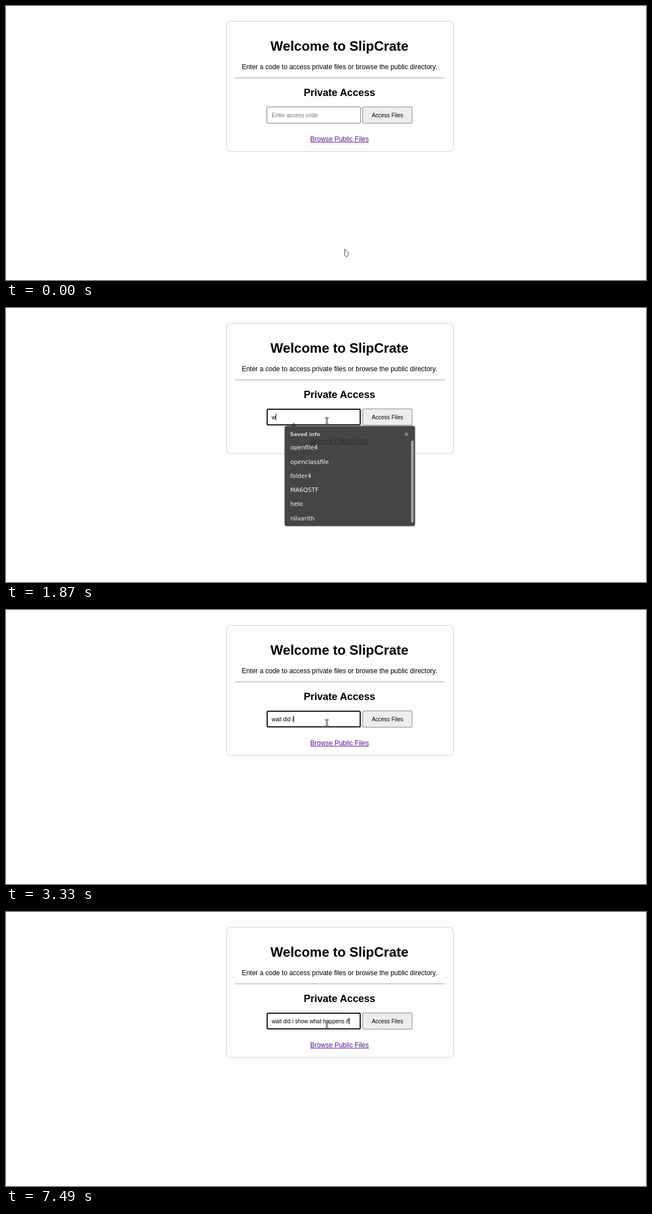
An HTML page that plays this animation: 1142x490 px, repeating every 8000 ms.

```html
<!DOCTYPE html>
<html lang="en">
<head>
<meta charset="utf-8">
<title>File access</title>
<style>
  html, body { margin: 0; width: 100%; height: 100%; overflow: hidden; background: #fdfdfd; }
  svg { display: block; width: 1142px; height: 490px; font-family: "Liberation Sans", Arial, sans-serif; }
  .mid { text-anchor: middle; }
  .bold { font-weight: bold; }
  .small { font-size: 10px; }
  #popup { font-family: "DejaVu Sans", sans-serif; font-size: 10.67px; fill: #f4f4f4; }
</style>
</head>
<body>
<svg viewBox="0 0 1142 490">
  <rect x="393.5" y="27.5" width="405" height="233" rx="7.5" fill="none" stroke="#cfcfd8"/>
  <text class="mid bold" x="595" y="80" font-size="24">Welcome to SlipCrate</text>
  <text class="mid" x="595" y="113" font-size="12">Enter a code to access private files or browse the public directory.</text>
  <path d="M408.5 128.5H783" stroke="#a0a0a0"/>
  <text class="mid bold" x="595" y="161" font-size="18">Private Access</text>

  <rect id="field" x="465.5" y="180.5" width="167" height="29" rx="1.5" fill="#fff" stroke="#767676"/>
  <text id="typed" class="small" x="474" y="198.5" xml:space="preserve"></text>
  <path id="caret" d="M.5 189V201" stroke="#000"/>
  <rect x="636.5" y="180.5" width="88" height="29" rx="1.5" fill="#ededed" stroke="#858585"/>
  <text class="mid small" x="680.7" y="198.5">Access Files</text>

  <g fill="#551a8b">
    <text class="mid" x="595.2" y="242" font-size="12">Browse Public Files</text>
    <path d="M543 243.5H647.5" stroke="#551a8b"/>
  </g>

  <g id="popup">
    <path d="M507 211L512.5 205L518 211Z" fill="#2b2b2b"/>
    <rect x="496.5" y="210.5" width="234" height="180" rx="3.5" fill="#2b2b2b" stroke="#555"/>
    <text class="bold" x="506" y="228.3" font-size="9.1" fill="#cfcfcf">Saved info</text>
    <path d="M712.5 222.5L718 228M718 222.5L712.5 228" stroke="#eee"/>
    <rect x="723.5" y="237" width="4.5" height="147" fill="#999"/>
  </g>

  <path id="arrow" d="M604.5 436.5L611 443V447L608.5 450.5L604.5 448Z" fill="#fff" stroke="#333"/>
  <g id="beam" fill="none">
    <path d="M569.5 196.5H575.5M572.5 196.5V207.5M569.5 207.5H575.5" stroke="#444" stroke-width="2.6"/>
    <path d="M570 196.5H575M572.5 196.5V207.5M570 207.5H575" stroke="#ddd" stroke-width=".8"/>
  </g>
</svg>
<script>
const LOOP = 8000, FOCUS = 430;
const MESSAGE = "wait did i show what happens if";
const KEYS = [
  1840, 1950, 2060, 2150, 2260,
  2930, 3010, 3110, 3230, 3330, 3470,
  3500, 3740, 3900, 4100, 4160,
  4360, 4430, 4510, 4580, 4650,
  4720, 4860, 5000, 5150, 5300, 5480, 5640, 5720,
  6770, 7380
];
const CARET_OFF = [[1290, 1840], [2580, 2930], [6320, 6770], [7180, 7380]];

const byId = id => document.getElementById(id);
const [field, typed, caret, popup, arrow, beam] =
  ["field", "typed", "caret", "popup", "arrow", "beam"].map(byId);
const show = (node, on) => node.style.display = on ? "" : "none";
const ramp = (t, from, to) => Math.min(1, Math.max(0, (t - from) / (to - from)));
const setAll = (node, attrs) => {
  for (const name in attrs) node.setAttribute(name, attrs[name]);
};

["openfile4", "openclassfile", "folder4", "MA6Q5TF", "helo", "nilvarith"].forEach((label, i) => {
  const item = document.createElementNS("http://www.w3.org/2000/svg", "text");
  setAll(item, { x: 506.5, y: 253 + i * 25.45 });
  item.textContent = label;
  popup.append(item);
});

const pen = document.createElement("canvas").getContext("2d");
pen.font = '10px "Liberation Sans", Arial, sans-serif';

function draw(t) {
  const focused = t >= FOCUS;
  setAll(field, focused
    ? { x: 466, y: 181, width: 166, height: 28, stroke: "#101010", "stroke-width": 2 }
    : { x: 465.5, y: 180.5, width: 167, height: 29, stroke: "#767676", "stroke-width": 1 });

  const text = MESSAGE.slice(0, KEYS.filter(key => key <= t).length);
  typed.textContent = text || "Enter access code";
  typed.setAttribute("fill", text ? "#000" : "#757575");
  caret.setAttribute("transform", `translate(${Math.round(474 + pen.measureText(text).width)})`);
  show(caret, focused && !CARET_OFF.some(([off, on]) => t >= off && t < on));

  // The popup grows slightly as it fades in and shrinks as it fades out.
  const opacity = ramp(t, 490, 690) * (1 - ramp(t, 1848, 2031));
  const scale = 0.95 + 0.05 * opacity;
  show(popup, opacity > 0);
  setAll(popup, {
    opacity,
    transform: `translate(613.5 300.5) scale(${scale}) translate(-613.5 -300.5)`
  });

  const move = ramp(t, 0, 130);
  arrow.setAttribute("transform", `translate(${-32 * move} ${-240 * move})`);
  show(arrow, move < 1);
  show(beam, move === 1);
}

const start = performance.now();
function tick() {
  draw((performance.now() - start) % LOOP);
  requestAnimationFrame(tick);
}
tick();
</script>
</body>
</html>
```
